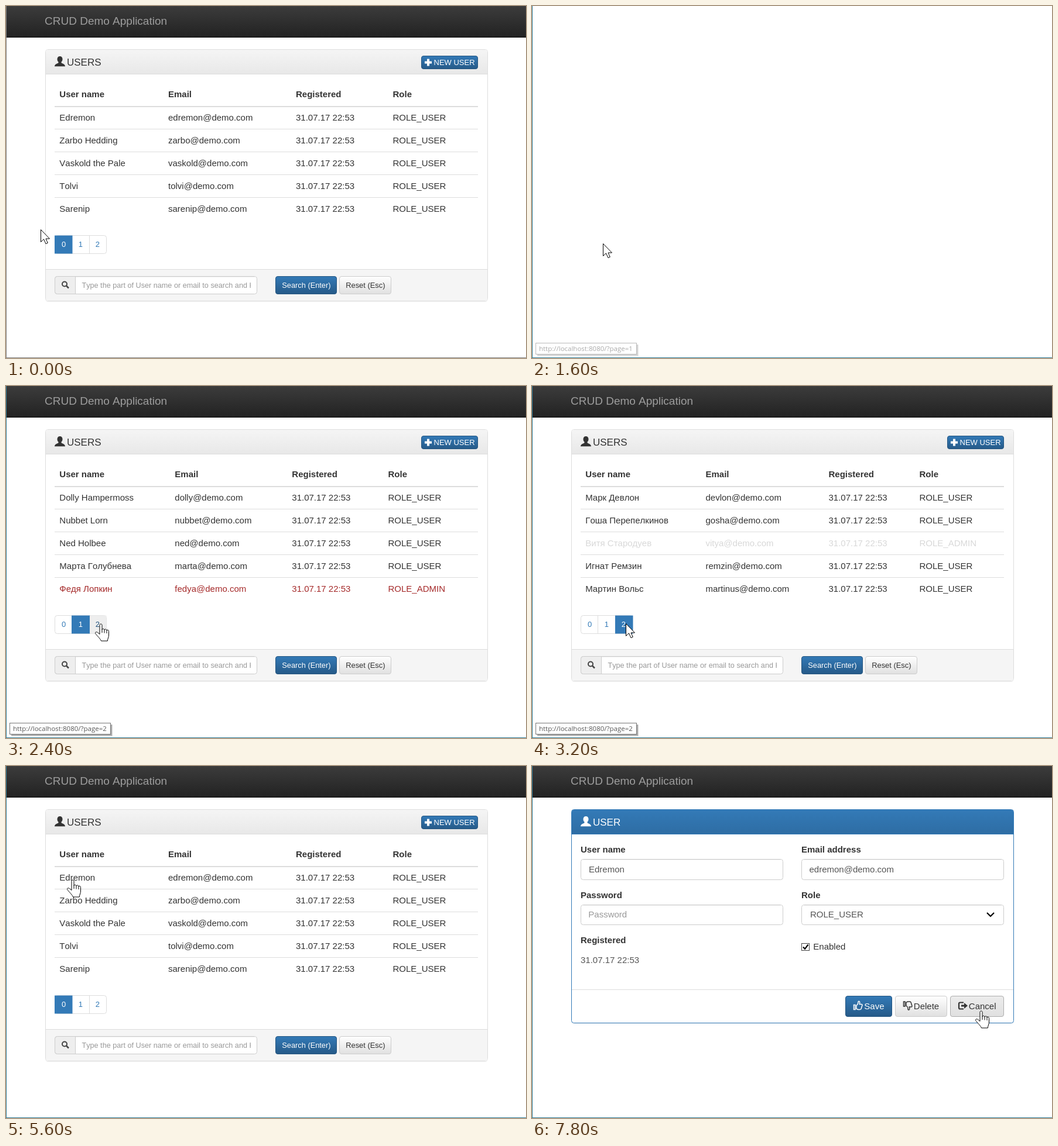
Animation of 888x602 px, one loop 8 s. Source, as an HTML page:

```html
<!DOCTYPE html>
<html lang="en">
<head>
<meta charset="utf-8">
<title>CRUD Demo Application</title>
<style>
html, body { margin: 0; width: 888px; height: 602px; overflow: hidden; background: #fff; }
svg { display: block; }
text { font: 15px "Liberation Sans", Arial, sans-serif; font-kerning: none; white-space: pre; }
</style>
</head>
<body>
<svg width="888" height="602" viewBox="0 0 888 602">
  <defs></defs>
  <g id="view"></g>
  <g id="status"></g>
  <path id="cursor" fill="#fff" stroke="#000" stroke-linejoin="round"/>
</svg>
<script>
const $ = selector => document.querySelector(selector);
const STEP = 200, LOOP = 8000;

const gradients = {
  nav: ['#3c3c3c', '#222'], heading: ['#f5f5f5', '#e8e8e8'], blueHeading: ['#337ab7', '#2e6da4'],
  primary: ['#337ab7', '#265a88'], plain: ['#fff', '#e0e0e0'], pressed: ['#ececec', '#e0e0e0'],
};
$('defs').innerHTML = Object.entries(gradients).map(([id, [top, bottom]]) =>
  `<linearGradient id="${id}" x2="0" y2="1"><stop stop-color="${top}"/><stop offset="1" stop-color="${bottom}"/></linearGradient>`).join('');

const DATE = '31.07.17 22:53';
const pages = [
  { columns: [91.3, 277, 495, 660.5], rows: [
    ['Edremon', 'edremon'], ['Zarbo Hedding', 'zarbo'], ['Vaskold the Pale', 'vaskold'],
    ['Tolvi', 'tolvi'], ['Sarenip', 'sarenip']] },
  { columns: [91.3, 288.3, 488.3, 652.5], rows: [
    ['Dolly Hampermoss', 'dolly'], ['Nubbet Lorn', 'nubbet'], ['Ned Holbee', 'ned'],
    ['Марта Голубнева', 'marta'], ['Федя Лопкин', 'fedya', 'ROLE_ADMIN', '#a52a2a']] },
  { columns: [91.3, 296.5, 506.5, 661.5], rows: [
    ['Марк Девлон', 'devlon'], ['Гоша Перепелкинов', 'gosha'],
    ['Витя Стародуев', 'vitya', 'ROLE_ADMIN', '#d8d8d8'],
    ['Игнат Ремзин', 'remzin'], ['Мартин Вольс', 'martinus']] },
];

// Shapes
const fill = (x, y, w, h, color) => `<rect x="${x}" y="${y}" width="${w}" height="${h}" fill="${color}"/>`;
const box = (x, y, right, bottom, color, border, r = 4) =>
  `<rect x="${x + .5}" y="${y + .5}" width="${right - x - 1}" height="${bottom - y - 1}" rx="${r}" fill="${color}" stroke="${border}"/>`;
const text = (x, y, string, color = '#333', size = 15, weight = 400) =>
  `<text x="${x}" y="${y}" fill="${color}" style="font-size:${size}px;font-weight:${weight}">${string}</text>`;
const label = (x, y, string) => text(x, y, string, '#333', 15, 700);
const path = (d, color, width = 1.6) => `<path d="${d}" fill="none" stroke="${color}" stroke-width="${width}"/>`;
const input = (x, y, right, bottom) =>
  box(x, y, right, bottom, '#fff', '#ccc') + fill(x + 2, y + 1, right - x - 4, 1, '#eee');
const button = (x, y, right, bottom, style) =>
  box(x, y, right, bottom, `url(#${style})`, { primary: '#245580', plain: '#ccc', pressed: '#adadad' }[style], 3.5);

const userIcon = color => `<path fill="${color}" d="M92 86c3 0 4.5 2 4.5 5 0 2-.8 3.7-2 4.8v1.4c2 1.4 6.5 2.200 6.500 6H83c0-3.800 4.500-4.600 6.500-6v-1.400c-1.200-1.100-2-2.800-2-4.800 0-3 1.500-5 4.500-5z"/>`;
const thumb = color =>
  path('M1 7H3.500V15H1ZM5.500 8Q8.500 6 8.500 2.500 8.500.8 9.800.8 12 1.200 10.800 6H14.500Q16 6.500 15.200 8.500L13.500 14Q13 15 11.500 15H8L5.500 13.800Z', color, 1.5);

const navbar = () => fill(0, 0, 888, 53, 'url(#nav)') + fill(0, 53, 888, 1, '#080808')
  + text(66, 32, 'CRUD Demo Application', '#9d9d9d', 19);

const panel = (bottom, border, heading, title, color) =>
  fill(69, bottom, 752, 1, '#f2f2f2') + box(67, 74, 823, bottom, '#fff', border)
  + `<path d="M68 116V78q0-3 3-3H819q3 0 3 3V116Z" fill="url(#${heading})"/>`
  + fill(68, 116, 754, 1, border) + userIcon(color) + text(104, 102, title, color, 17);

function pagination(active, hovered) {
  const starts = [83, 112, 142, 171];
  const cells = [0, 1, 2].map(i => {
    const color = i === active ? '#337ab7' : i === hovered ? '#eee' : '';
    return (color && fill(starts[i] + (i === active ? 0 : 1), 392.5, starts[i + 1] - starts[i] + (i === active ? 2 : 0) - .5, 31, color))
      + (i ? fill(starts[i], 393, 1, 30, i === active || i === active + 1 ? '#337ab7' : '#ddd') : '')
      + text(starts[i] + [12, 11.7, 10.8][i], 412, i, i === active ? '#fff' : i === hovered ? '#23527c' : '#337ab7', 13);
  });
  return box(83, 392, 172, 424, '#fff', '#ddd') + cells.join('');
}

function list(index, hovered) {
  const { columns, rows } = pages[index];
  const header = ['User name', 'Email', 'Registered', 'Role'];
  const table = rows.map(([name, mail, role = 'ROLE_USER', color], i) =>
    fill(83, 171 + 39 * i, 723, i ? 1 : 2, '#ddd').replace(/y="(\d+)"/, (_, y) => `y="${y}"`)
    + [name, mail + '@demo.com', DATE, role].map((s, c) => text(columns[c], 196 + 39 * i, s, color)).join('')).join('');
  return navbar() + panel(505, '#ddd', 'heading', 'USERS', '#333')
    + button(709, 85, 806, 108, 'primary') + path('M715 96.500H727M721 90.500V102.500', '#fff', 4)
    + text(730.5, 101, 'NEW USER', '#fff', 13)
    + header.map((s, c) => label(columns[c], 156, s)).join('') + table
    + pagination(index, hovered)
    + `<path d="M68 450H822V501q0 3-3 3H71q-3 0-3-3Z" fill="#f5f5f5"/>` + fill(68, 450, 754, 1, '#ddd')
    + input(83, 462, 429, 493) + `<path d="M118.500 462.500H87.500q-4 0-4 4V488.500q0 4 4 4H118.500Z" fill="#eee" stroke="#ccc"/>`
    + '<circle cx="100" cy="475.500" r="4" fill="none" stroke="#444" stroke-width="2"/>' + path('M103 478.500L107 482.500', '#444', 2.5)
    + `<svg x="119" y="463" width="299" height="29">${text(10.5, 19, 'Type the part of User name or email to search and Hit', '#999', 12.65)}</svg>`
    + button(460, 462, 565, 493, 'primary') + text(471.3, 482, 'Search (Enter)', '#fff', 12.8)
    + button(569, 462, 658, 493, 'plain') + text(580.2, 482, 'Reset (Esc)', '#333', 12.9);
}

function form(hovered) {
  const [name, mail] = pages[0].rows[0];
  const style = i => i === hovered ? 'pressed' : 'plain';
  return navbar() + panel(440, '#337ab7', 'blueHeading', 'USER', '#fff')
    + label(83, 148, 'User name') + input(83, 159, 429, 195) + text(97, 182, name, '#555')
    + label(460, 148, 'Email address') + input(460, 159, 806, 195) + text(473.5, 182, mail + '@demo.com', '#555')
    + label(83, 226, 'Password') + input(83, 237, 429, 272) + text(96.3, 259, 'Password', '#999')
    + label(460, 226, 'Role') + input(460, 237, 806, 272) + text(475, 259, 'ROLE_USER', '#555')
    + path('M777 251L783 257L789 251', '#000', 2.2)
    + label(83, 303, 'Registered') + text(83, 337, DATE, '#555')
    + box(460, 303, 474, 316, '#fff', '#444', 0) + path('M463 309.500L466 312.800L471.500 305.500', '#000', 2.2)
    + text(480.3, 314, 'Enabled')
    + fill(68, 382, 754, 1, '#ddd')
    + button(535, 393, 615, 429, 'primary') + `<g transform="translate(548.500 401.500)">${thumb('#fff')}</g>` + text(567.3, 416, 'Save', '#fff')
    + button(620, 393, 709, 429, style(0)) + `<g transform="translate(633.500 418) scale(1 -1)">${thumb('#333')}</g>` + text(651.8, 416, 'Delete')
    + button(714, 393, 806, 429, style(1)) + path('M737 404.500H731Q729 404.500 729 406.500V413.500Q729 415.500 731 415.500H737', '#333', 2.2)
    + '<path d="M733 408.500H738V405L744 410L738 415V411.500H733Z" fill="#333"/>' + text(745.8, 416, 'Cancel');
}

// Pointer: [time, x, y]
const track = [
  [0, 59, 382], [600, 75, 390], [1000, 121, 406], [1800, 121, 406], [2200, 160, 406], [3200, 160, 406],
  [3800, 99, 411], [4800, 99, 411], [5600, 112, 194], [6800, 112, 194], [7800, 765, 418], [8000, 765, 418],
];
const ARROW = 'M.5.5V21.500L5.500 16.800L9 24.700L12.300 23.200L9 16H15.500Z';
const HAND = 'M0 18.500V3.200C0 .2 4 .2 4 3.200V11C4 8.500 8 8.700 8 11.500C8 9.200 12 9.400 12 12.200C12 10.500 15.500 10.700 15.500 13.500V20C15.500 24 13.500 26 13.300 30H2.500C1.500 27-2.500 23-6.500 18.500C-9 15.500-6 13.500-3.500 15.500ZM4 11V16M8 11.500V16.500M12 12.200V17';

function pointer(t) {
  const i = track.findIndex(key => key[0] > t);
  const [t0, x0, y0] = track[i - 1], [t1, x1, y1] = track[i];
  const u = (t - t0) / (t1 - t0), ease = u * u * (3 - 2 * u);
  return [Math.round(x0 + (x1 - x0) * ease), Math.round(y0 + (y1 - y0) * ease)];
}

const inside = (x, y, left, top, right, bottom) => x >= left && x < right && y >= top && y < bottom;

// Link hints: [page, fade-in start, fade-out end]
const hints = [[1, 1000, 1800], [2, 2000, 3600], [0, 3600, 4800]];

function hint(t) {
  const current = hints.find(([, from, to]) => t > from && t < to);
  if (!current) return '';
  const [page, from, to] = current;
  const opacity = Math.min(1, (t - from) / 400, (to - t) / 400);
  return `<g opacity="${opacity}">` + fill(9, 579, 173, 20, '#ddd') + fill(9, 579, 172, 19, '#aaa')
    + box(6, 576, 179, 596, '#fff', '#767676', 0)
    + `<text x="12" y="590" fill="#575757" style="font:11.5px 'Open Sans',sans-serif">http://localhost:8080/?page=${page}</text></g>`;
}

function draw(t) {
  const [x, y] = pointer(t);
  const blank = t === 1600, editing = t >= 6600;
  const page = t < 1600 ? 0 : t < 3000 ? 1 : t < 4600 ? 2 : 0;
  const visible = t < 200 || t >= 600;
  let hovered = -1, hand = false;
  if (editing) {
    hovered = [[620, 709], [714, 806]].findIndex(([l, r]) => inside(x, y, l, 393, r, 429));
    hand = hovered >= 0 || inside(x, y, 535, 393, 615, 429);
  } else if (!blank && visible) {
    hovered = [83, 113, 142].findIndex(l => inside(x, y, l, 392, l + 29, 424));
    hand = hovered >= 0 && hovered !== page || inside(x, y, 83, 173, 806, 366);
  }
  const frame = t < 600 ? '#808080' : '#2f7d98';
  $('#view').innerHTML = (blank ? '' : editing ? form(hovered) : list(page, hovered))
    + fill(0, 0, 1, 602, frame) + fill(0, 601, 888, 1, frame);
  $('#status').innerHTML = hint(t);
  const cursor = $('#cursor');
  cursor.setAttribute('d', hand ? HAND : ARROW);
  cursor.setAttribute('transform', `translate(${x} ${y})`);
  cursor.setAttribute('visibility', visible ? 'visible' : 'hidden');
}

let shown = -1;
function tick() {
  const t = Math.floor(performance.now() % LOOP / STEP) * STEP;
  if (t !== shown) draw(shown = t);
  requestAnimationFrame(tick);
}
tick();
</script>
</body>
</html>
```
